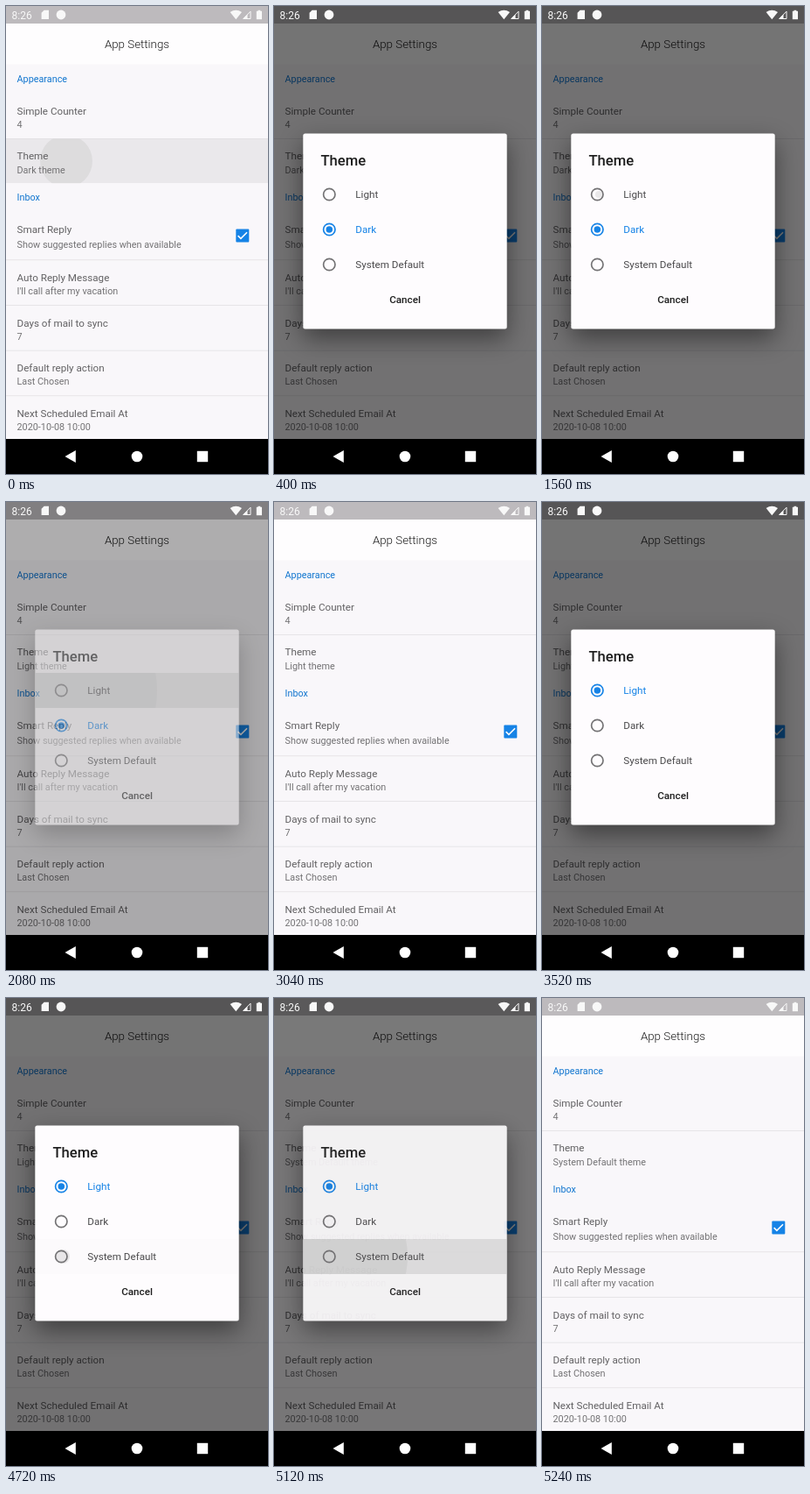
Write an HTML page with a canvas that moves like this. It is 300 by 534 pixels and loops after 5280 ms.

```html
<!DOCTYPE html>
<html lang="en">
<head>
<meta charset="utf-8">
<title>App Settings</title>
<style>
  html, body { margin: 0; width: 100%; height: 100%; overflow: hidden; background: #000; }
  canvas { display: block; width: 300px; height: 534px; }
</style>
</head>
<body>
<canvas id="stage"></canvas>
<script>
const W = 300, H = 534, NAV_TOP = 494, LOOP = 5280, STEP = 40, FADE = 150;
const BLUE = '#1683e6';
const dpr = window.devicePixelRatio || 1;

function setup(canvas) {
  canvas.width = W * dpr;
  canvas.height = H * dpr;
  const c = canvas.getContext('2d');
  c.scale(dpr, dpr);
  return c;
}

const ctx = setup(document.getElementById('stage'));
const layer = document.createElement('canvas');
const dlg = setup(layer);

// Each visit to the dialog: row press, opening, option press, closing.
const visits = [
  { press: -130, open: 250, pick: 1540, close: 1981, chosen: 1, next: 0 },
  { press: 3040, open: 3370, pick: 4680, close: 5085, chosen: 0, next: 2 }
];
const options = ['Light', 'Dark', 'System Default'];

const rows = [
  ['Simple Counter', 123.5, '4', 139],
  ['Theme', 175.3, '', 190.5],
  ['Smart Reply', 258.7, 'Show suggested replies when available', 275.7],
  ['Auto Reply Message', 313.8, "I'll call after my vacation", 329],
  ['Days of mail to sync', 365.5, '7', 380.7],
  ['Default reply action', 417.2, 'Last Chosen', 432.4],
  ['Next Scheduled Email At', 468.9, '2020-10-08 10:00', 484.1]
];

const clamp = v => Math.max(0, Math.min(1, v));

function bezier(x1, y1, x2, y2) {
  const at = (a, b, s) => 3 * a * s * (1 - s) ** 2 + 3 * b * s * s * (1 - s) + s ** 3;
  return x => {
    let lo = 0, hi = 1;
    for (let i = 0; i < 24; i++) {
      const mid = (lo + hi) / 2;
      if (at(x1, x2, mid) < x) lo = mid; else hi = mid;
    }
    return x <= 0 ? 0 : x >= 1 ? 1 : at(y1, y2, lo);
  };
}
const ease = bezier(0.25, 0.1, 0.25, 1);
const easeOut = bezier(0, 0, 0.58, 1);

function rect(c, x, y, w, h, color) {
  c.fillStyle = color;
  c.fillRect(x, y, w, h);
}

function text(c, str, x, y, size, color, weight = 400, align = 'left') {
  c.font = `${weight} ${size}px Roboto, sans-serif`;
  c.textAlign = align;
  c.fillStyle = color;
  c.fillText(str, x, y);
}

function disc(c, x, y, r, color) {
  c.fillStyle = color;
  c.beginPath();
  c.arc(x, y, r, 0, 7);
  c.fill();
}

function poly(c, points, color) {
  c.fillStyle = color;
  c.beginPath();
  points.forEach(([x, y]) => c.lineTo(x, y));
  c.closePath();
  c.fill();
}

// Row highlight with a growing splash, clipped to the row.
function ink(c, x, y, w, h, cx, cy, radius, glow, splash) {
  c.save();
  c.beginPath();
  c.rect(x, y, w, h);
  c.clip();
  rect(c, x, y, w, h, `rgba(188,188,188,${0.4 * glow})`);
  disc(c, cx, cy, radius, `rgba(200,200,200,${0.4 * splash})`);
  c.restore();
}

function drawPage(t, themeName) {
  rect(ctx, 0, 0, W, NAV_TOP, '#f9f7fa');
  rect(ctx, 0, 20, W, 46.7, '#fefdfe');
  rect(ctx, 0, 0, W, 20, '#bdbabd');
  for (const y of [151, 289.3, 341, 392.7, 444.3]) rect(ctx, 0, y, W, 0.9, '#e5e3e6');

  for (const v of visits) {
    const age = t - v.press, since = Math.max(0, t - v.open);
    const left = 1 - clamp(since / 130);
    if (age < 0 || left === 0) continue;
    const r = 0.23 * (age - since) + since;
    ink(ctx, 0, 151.5, W, 50.7, 69, 177, r, clamp(age / 200) * left, left);
  }

  text(ctx, 'App Settings', 150, 48, 13.33, '#1c1c1c', 300, 'center');
  text(ctx, 'Appearance', 12.5, 87.4, 10.83, '#1276cf');
  text(ctx, 'Inbox', 12.5, 222.2, 10.83, '#1276cf');
  for (const [title, y, sub, subY] of rows) {
    text(ctx, title, 12.5, y, 11.67, '#626163');
    text(ctx, sub || themeName + ' theme', 12.5, subY, 10.83, '#737274');
  }

  ctx.fillStyle = BLUE;
  ctx.beginPath();
  ctx.roundRect(263.3, 254.5, 15, 15, 1);
  ctx.fill();
  ctx.strokeStyle = '#fff';
  ctx.lineWidth = 1.6;
  ctx.beginPath();
  ctx.moveTo(265.6, 262.1);
  ctx.lineTo(268.9, 265.4);
  ctx.lineTo(276, 258.3);
  ctx.stroke();
}

function drawStatus() {
  const white = '#f8f8f8';
  text(ctx, '8:26', 6.5, 14.5, 12, white);
  poly(ctx, [[43.6, 4.8], [49, 4.8], [49, 15], [40.6, 15], [40.6, 7.8]], white);
  disc(ctx, 63, 10, 5.4, white);

  ctx.fillStyle = white;
  ctx.beginPath();
  ctx.moveTo(263.3, 15.2);
  ctx.lineTo(256.6, 7);
  ctx.quadraticCurveTo(263.3, 2.6, 270, 7);
  ctx.fill();

  ctx.strokeStyle = white;
  ctx.lineWidth = 1;
  ctx.beginPath();
  ctx.moveTo(280, 6.2);
  ctx.lineTo(280, 14.5);
  ctx.lineTo(271.7, 14.5);
  ctx.closePath();
  ctx.stroke();
  poly(ctx, [[276.5, 9.7], [276.5, 14.8], [271.4, 14.8]], white);

  rect(ctx, 286.8, 5.8, 6.2, 9.4, white);
  rect(ctx, 288.5, 4.8, 2.8, 1.2, white);
}

function drawNav() {
  rect(ctx, 0, NAV_TOP, W, H - NAV_TOP, '#000');
  poly(ctx, [[67.5, 514], [79.8, 507], [79.8, 521]], '#fff');
  disc(ctx, 150, 514, 6.3, '#fff');
  rect(ctx, 218.8, 507.8, 12.4, 12.4, '#fff');
}

function drawDialog(t, v) {
  dlg.clearRect(0, 0, W, H);
  dlg.save();
  dlg.shadowColor = 'rgba(0,0,0,.45)';
  dlg.shadowBlur = 28 * dpr;
  dlg.shadowOffsetY = 11 * dpr;
  dlg.fillStyle = '#fefcfe';
  dlg.beginPath();
  dlg.roundRect(33.3, 145.5, 233.4, 223, 2.5);
  dlg.fill();
  dlg.restore();

  const age = t - v.pick;
  if (age > 0) {
    const y = 195 + 40 * v.next;
    ink(dlg, 33.3, y, 233.4, 40, 65, y + 20, 0.2 * age, clamp((age - 20) / 200), 1);
  }

  text(dlg, 'Theme', 53.5, 181.5, 16.67, '#1d1d1d', 500);
  options.forEach((name, i) => {
    const y = 215 + 40 * i, on = i === v.chosen;
    dlg.strokeStyle = on ? BLUE : '#737274';
    dlg.lineWidth = 1.67;
    dlg.beginPath();
    dlg.arc(63.3, y, 6.7, 0, 7);
    dlg.stroke();
    if (on) disc(dlg, 63.3, y, 3.75, BLUE);
    text(dlg, name, 93.3, y + 4.1, 11.67, on ? BLUE : '#4b4a4c');
  });
  text(dlg, 'Cancel', 150, 339.2, 11.67, '#1d1d1d', 500, 'center');
}

function draw(t) {
  const v = visits[t < 3040 ? 0 : 1];
  const shown = t < v.close ? clamp((t - v.open) / FADE) : 1 - clamp((t - v.close) / FADE);
  drawPage(t, options[t < v.close ? v.chosen : v.next]);
  if (shown > 0) {
    rect(ctx, 0, 0, W, NAV_TOP, `rgba(0,0,0,${0.54 * ease(shown)})`);
    drawDialog(t, v);
    ctx.globalAlpha = easeOut(shown);
    ctx.drawImage(layer, 0, 0, W, H);
    ctx.globalAlpha = 1;
  }
  drawStatus();
  drawNav();
}

const start = performance.now();
function frame() {
  const now = (performance.now() - start) % LOOP;
  let t = Math.floor(now / STEP) * STEP;
  if (t > 120 && t < 280) t = 120; // the first press pauses briefly
  draw(t);
  requestAnimationFrame(frame);
}
frame();
</script>
</body>
</html>
```
